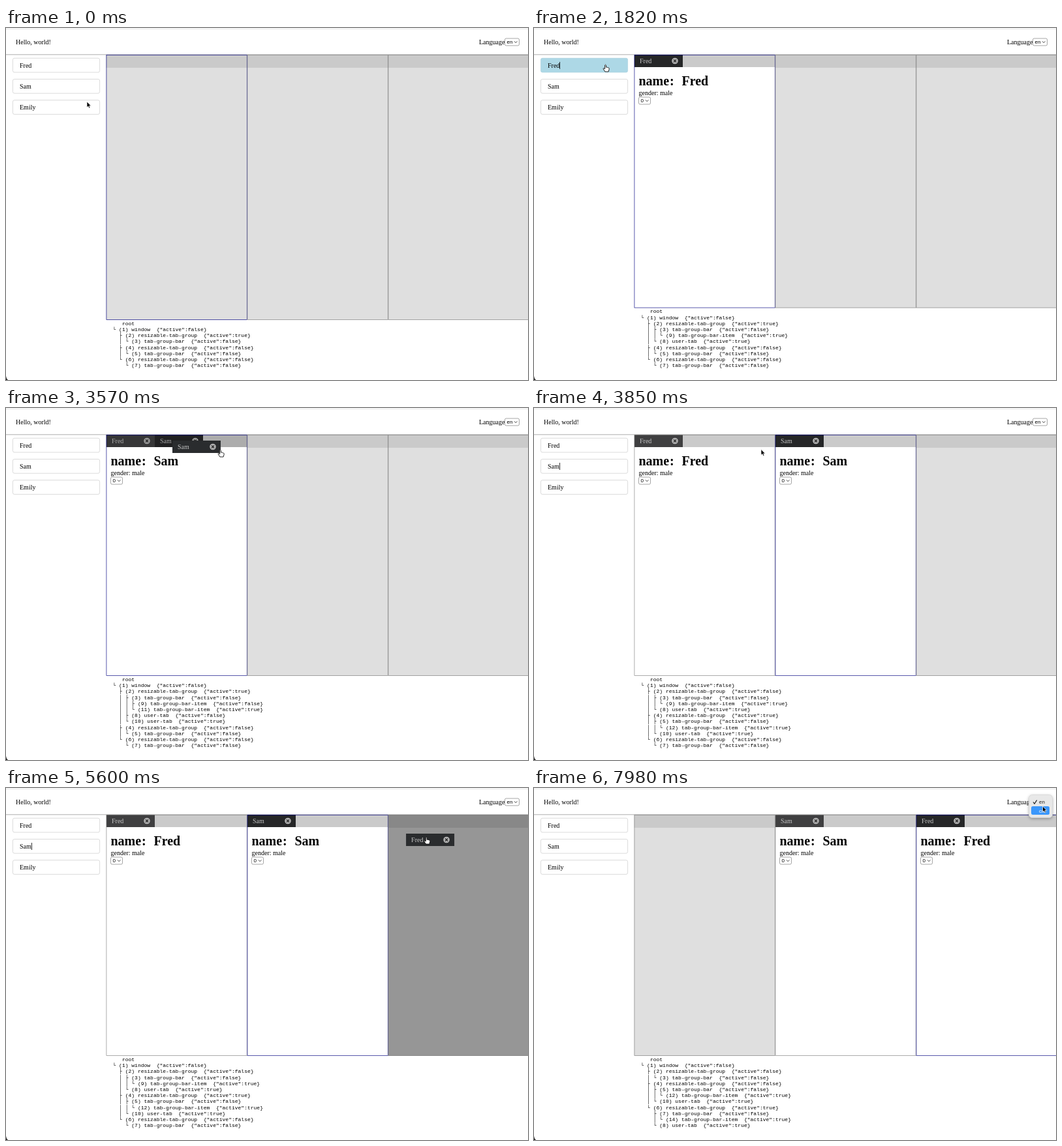
An HTML page that plays this animation: 800 by 540 pixels, repeating every 8000 ms.

```html
<!DOCTYPE html>
<html lang="en">
<head>
<meta charset="utf-8">
<style>
html, body { margin: 0; width: 100%; height: 100%; overflow: hidden; background: #fff; }
svg { display: block; width: 800px; height: 540px; }
text { font: 10px "Liberation Serif", serif; white-space: pre; }
.sans { font: 8px "Liberation Sans", sans-serif; }
.mono { font: 8px "Liberation Mono", monospace; }
.big { font-size: 20px; font-weight: bold; }
</style>
</head>
<body>
<svg id="stage" viewBox="0 0 800 540"></svg>
<script>
const LOOP = 8000, STEP = 70;
const PEOPLE = ['Fred', 'Sam', 'Emily'];
const [FRED, SAM] = PEOPLE;
const LAG = 70, GRAB = [34, 5];
const DRAGS = [[3360, 3710, SAM], [4200, 5700, FRED]];
const MENU_AT = 7630;
const HAIR = .65; // width of a border
const LEFT = 153.6, TOP = 41, WIDE = 216;

// pointer path: time, x, y
const PATH = [
  [0, 124, 113], [70, 124, 113], [140, 122, 113], [210, 121, 112], [560, 109.5, 56],
  [1820, 109.5, 56], [2240, 105, 87], [2800, 105, 87], [3220, 262, 46], [3360, 263, 46],
  [3500, 289, 55], [3570, 328.5, 64], [3660, 430, 75], [3710, 430, 75], [3850, 348, 63.5],
  [4130, 188, 46], [4270, 188, 46], [4900, 501, 68.5], [4970, 501.5, 68.5], [5460, 650, 75],
  [5700, 640, 75], [5950, 627.5, 71], [6500, 640, 72], [7350, 774, 20], [7840, 774, 20],
  [7980, 779.5, 28], [LOOP, 779.5, 28]
];

const rect = (x, y, w, h, fill, more = '') =>
  `<rect x="${x}" y="${y}" width="${w}" height="${h}" fill="${fill}" ${more}/>`;
const text = (x, y, s, cls = '', fill = '#000') =>
  `<text x="${x}" y="${y}" class="${cls}" fill="${fill}">${s}</text>`;
const line = (d, color, width = 1) =>
  `<path d="${d}" fill="none" stroke="${color}" stroke-width="${width}"/>`;

function pointer(t) {
  const i = Math.max(1, PATH.findIndex(k => k[0] >= t));
  const [a, b] = [PATH[i - 1], PATH[i]];
  const u = (t - a[0]) / (b[0] - a[0]);
  return [a[1] + (b[1] - a[1]) * u, a[2] + (b[2] - a[2]) * u];
}

// open tabs of the three groups, and which group has focus
function layout(t) {
  const fred = { item: 9, id: 8, name: FRED, on: true };
  const sam = { item: 11, id: 10, name: SAM, on: true };
  if (t < 1820) return { focus: 0, groups: [[], [], []] };
  if (t < 2730) return { focus: 0, groups: [[fred], [], []] };
  if (t < 3710) return { focus: 0, groups: [[{ ...fred, on: false }, sam], [], []] };
  sam.item = 12;
  if (t < 5700) return { focus: 1, groups: [[fred], [sam], []] };
  fred.item = 14;
  return { focus: 2, groups: [[], [sam], [fred]] };
}

function treeLines({ focus, groups }) {
  const node = (id, name, active, kids = []) => ({ id, name, active, kids });
  const win = node(1, 'window', false, groups.map((tabs, i) =>
    node(2 + 2 * i, 'resizable-tab-group', i === focus, [
      node(3 + 2 * i, 'tab-group-bar', false, tabs.map(b => node(b.item, 'tab-group-bar-item', b.on))),
      ...tabs.map(b => node(b.id, 'user-tab', b.on))
    ])));
  const lines = ['   root'];
  (function walk(n, indent, last) {
    lines.push(`${indent}${last ? '└' : '├'} (${n.id}) ${n.name}  {"active":${n.active}}`);
    n.kids.forEach((k, i) => walk(k, indent + (last ? '  ' : '│ '), i === n.kids.length - 1));
  })(win, '', true);
  return lines;
}

function select(x, y, w, label) {
  return rect(x, y, w, 11, '#fff', `rx="2" stroke="#767676" stroke-width="${HAIR}"`) +
    text(x + 3, y + 8.4, label, 'sans') +
    line(`M${x + w - 7.5} ${y + 4.3}l2.2 2.4 2.2-2.4`, '#333', .9);
}

function tab(x, y, name, fill) {
  return rect(x, y, 74, 19, fill) + text(x + 8, y + 13.3, name, '', '#c4c4c4') +
    `<circle cx="${x + 62}" cy="${y + 9.5}" r="4.8" fill="#b0b0b0"/>` +
    line(`M${x + 60} ${y + 7.5}l4 4m0-4l-4 4`, '#222', 1.1);
}

function group(i, tabs, focused, bottom) {
  const x = LEFT + WIDE * i, shown = tabs.find(b => b.on);
  let s = rect(x, TOP, WIDE, bottom - TOP, shown ? '#fff' : '#dfdfdf') +
    rect(x, TOP, WIDE, shown ? 19 : 20, '#cacaca');
  tabs.forEach((b, k) => s += tab(x + .4 + 74 * k, TOP, b.name, focused && b.on ? '#252627' : '#3f3f40'));
  if (shown) {
    s += text(x + 6.9, 87.5, `name<tspan x="${x + 54.4}">:</tspan><tspan x="${x + 72.9}">${shown.name}</tspan>`, 'big') +
      text(x + 6.9, 103, 'gender: male') + select(x + 6.9, 106, 18, '0');
  }
  return s;
}

const frame = (i, bottom, color) =>
  rect(LEFT + WIDE * i + HAIR / 2, TOP + HAIR / 2, WIDE - HAIR, bottom - TOP - HAIR, 'none',
    `stroke="${color}" stroke-width="${HAIR}"`);

function sidebar(t, [px, py]) {
  return PEOPLE.map((name, i) => {
    const y = 46.3 + 32.2 * i;
    const over = t >= 140 && px > 10 && px < 144 && py > y && py < y + 22;
    return rect(10.4, y, 133.2, 21.7, over ? '#add8e6' : '#fff',
      `rx="2.5" stroke="${over ? '#a9d0dd' : '#c8c8c8'}" stroke-width="${HAIR}"`) +
      text(21, y + 14.2, name);
  }).join('');
}

function caret(t) {
  const second = t >= 2590, since = t - (second ? 2590 : 1680);
  if (since < 0 || t > 7090 || since % 1000 >= 500) return '';
  return second ? line('M39.5 84V95', '#000', .8) : line('M39.5 52V63', '#000', .8);
}

function menu(py) {
  const cn = py > 26;
  return rect(758.5, 10.5, 36, 35, '#e8e8e8', 'rx="5" stroke="#d0d0d0" stroke-width=".6" filter="url(#soft)"') +
    rect(762, cn ? 28 : 15, 28, 13, '#3b97fb', 'rx="2.5"') +
    line('M765 21.5l2 2.7 3.6-5.6', cn ? '#222' : '#fff', 1.2) +
    text(774, 24.3, 'en', 'sans', cn ? '#222' : '#fff') +
    text(774, 37.6, 'cn', 'sans', cn ? '#fff' : '#222');
}

function cursor([x, y], hand) {
  const d = hand
    ? 'M-.9 1Q0-.6 .9 1V4.3Q2 3.4 2.7 4.6 4 4 4.4 5.2 5.8 5 5.8 6.4L5.2 9 4.6 11H-.6L-3.3 6.8Q-3.4 5.2-2 5.8L-.9 7Z'
    : 'M0 0V8.8L2 7 3.4 10 4.9 9.3 3.6 6.4H6.3Z';
  return `<path transform="translate(${x} ${y})" d="${d}" ` +
    (hand ? 'fill="#fff" stroke="#111" stroke-width=".9"/>' : 'fill="#000" stroke="#fff" stroke-width=".7"/>');
}

function scene(t) {
  const p = pointer(t), state = layout(t), lines = treeLines(state);
  const bottom = 521.6 - 9.22 * lines.length;
  const drag = DRAGS.find(d => t >= d[0] && t < d[1]);
  const { groups, focus } = state;

  let s = `<defs><filter id="soft" x="-50%" y="-50%" width="200%" height="200%">
    <feDropShadow dx="0" dy="1.5" stdDeviation="2" flood-opacity=".3"/></filter></defs>`;
  s += rect(0, 0, 800, 540, '#fff') + rect(0, 1, 800, 1, '#e6e6e6') +
    rect(0, 40, 800, 1, '#c8c8c8') + rect(0, 41, 800, 1, '#e4e4e4') +
    text(15, 24.5, 'Hello, world!') + text(725, 24.5, 'Language') + select(764.5, 16, 22, 'en') +
    sidebar(t, p) + caret(t);

  groups.forEach((tabs, i) => s += group(i, tabs, i === focus, bottom));
  let ghost = '';
  if (drag) {
    const [gx, gy] = pointer(Math.max(drag[0], t - LAG));
    const i = Math.floor((gx - LEFT) / WIDE);
    const onBar = gy < 61;
    s += rect(LEFT + WIDE * i, TOP, WIDE, onBar ? 19 : bottom - TOP, '#000', `opacity="${onBar ? .15 : .33}"`);
    ghost = tab(gx - GRAB[0], gy - GRAB[1], drag[2], '#2a2c2e');
  }
  groups.forEach((_, i) => s += frame(i, bottom, i === focus ? '#000080' : '#808080'));
  s += ghost;

  lines.forEach((l, i) => s += text(163.5, 520.3 - 9.22 * (lines.length - 1 - i), l, 'mono'));
  s += '<path d="M0 534Q.5 538 3 540H0Z" fill="#222"/>';
  if (t >= MENU_AT) s += menu(p[1]);

  const onItem = t >= 140 && p[0] < 144 && p[1] > 46 && p[1] < 132;
  return s + cursor(p, drag || onItem);
}

const stage = document.getElementById('stage');
let shown = -1;
function tick() {
  const t = Math.floor(performance.now() % LOOP / STEP) * STEP;
  if (t !== shown) stage.innerHTML = scene(shown = t);
  requestAnimationFrame(tick);
}
tick();
</script>
</body>
</html>
```
